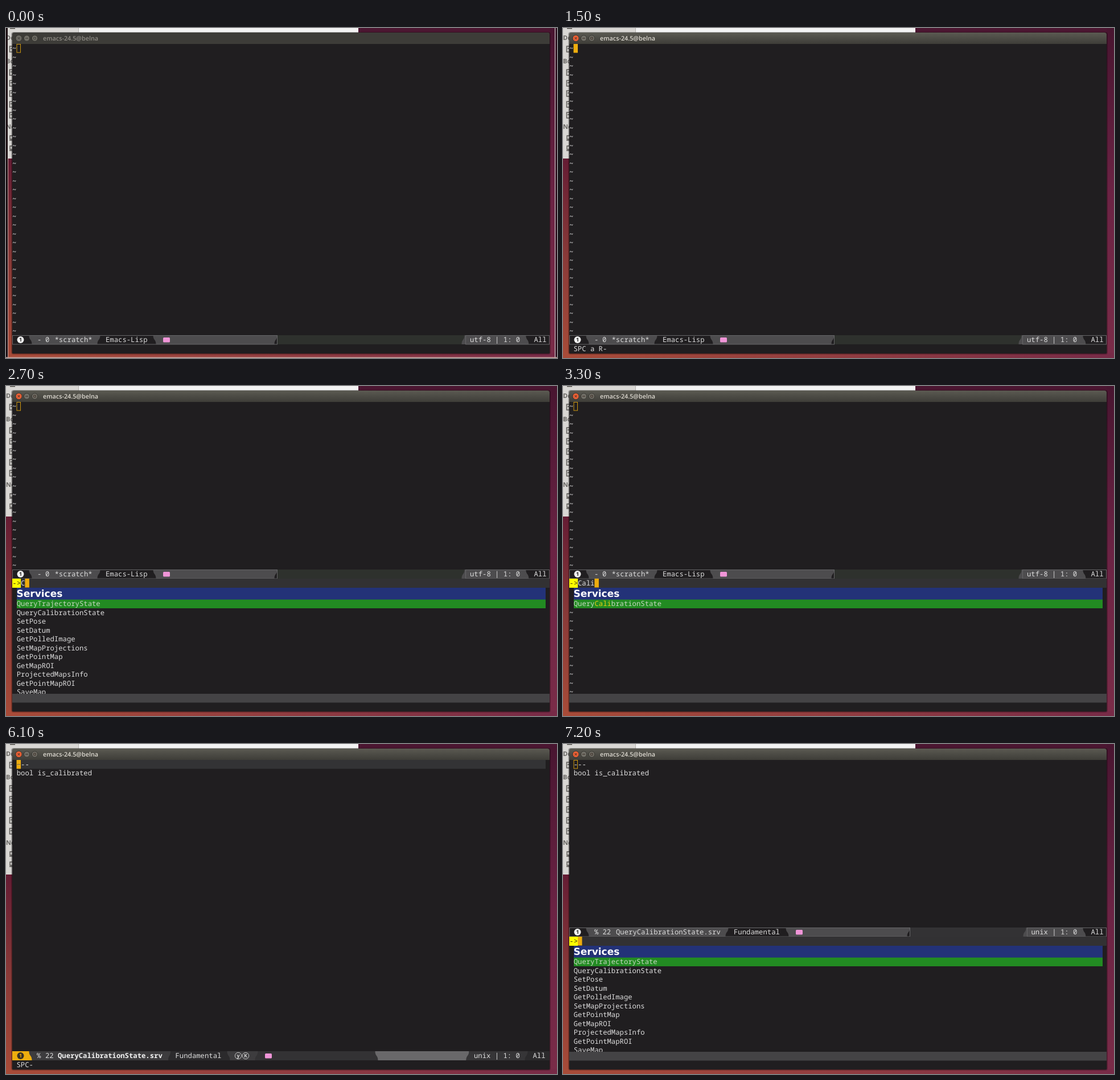
Recreate the animation shown at these times as an HTML page. Size 968 by 579 pixels, loop 8000 ms.

```html
<!DOCTYPE html>
<html lang="en">
<head>
<meta charset="utf-8">
<title>Editor session</title>
<style>
html, body { margin: 0; width: 100%; height: 100%; overflow: hidden; background: #4e1733; }
svg { display: block; width: 968px; height: 579px; }
text { white-space: pre; text-rendering: geometricPrecision; }
.m { font: 12.25px "Noto Sans Mono", "DejaVu Sans Mono", monospace; }
.b { font-weight: 700; }
.u { font: 600 10.8px "Open Sans", "Noto Sans", sans-serif; }
.h { font: 700 17px "DejaVu Sans", sans-serif; }
.p { font: 700 11px "Open Sans", "Noto Sans", sans-serif; }
.c { font: 700 9px "Noto Sans", sans-serif; text-anchor: middle; }
</style>
</head>
<body>
<svg id="stage" viewBox="0 0 968 579" xmlns="http://www.w3.org/2000/svg"></svg>
<script>
const LOOP = 8000, ROW = 15.5, TOP = 28;
const BG = '#201e20', FG = '#dedede', GOLD = '#eead0e';
let css = '', count = 0;

const rect = (x, y, w, h, fill, extra = '') =>
  `<rect x="${x}" y="${y}" width="${w}" height="${h}" fill="${fill}" ${extra}/>`;
const text = (x, y, s, fill = FG, cls = 'm') =>
  `<text x="${x}" y="${y}" fill="${fill}" class="${cls}">${s.replace(/>/g, '&gt;')}</text>`;
const circle = (x, y, r, fill, extra = '') =>
  `<circle cx="${x}" cy="${y}" r="${r}" fill="${fill}" ${extra}/>`;

// Shows the markup only between two times of the loop.
function on(from, to, markup) {
  const name = 'k' + count++, pct = t => (t / LOOP * 100) + '%';
  css += `@keyframes ${name}{0%{opacity:${from ? 0 : 1}}`;
  if (from) css += `${pct(from)}{opacity:1}`;
  css += to < LOOP ? `${pct(to)}{opacity:0}100%{opacity:0}}` : '100%{opacity:1}}';
  css += `.${name}{animation:${name} ${LOOP}ms step-end infinite}`;
  return `<g class="${name}">${markup}</g>`;
}

function gradient(id, dir, ...stops) {
  const end = dir === 'v' ? 'x2="0" y2="1"' : 'x2="1" y2="0"';
  return `<linearGradient id="${id}" x1="0" y1="0" ${end}>` + stops.map((c, i) =>
    `<stop offset="${i / (stops.length - 1)}" stop-color="${c}"/>`).join('') + '</linearGradient>';
}

// Mode line piece; l and r lean its two edges at the top.
function seg(y, x0, x1, l, r, fill) {
  const b = y + 16;
  return `<path fill="${fill}" d="M${x0 + l} ${y}H${x1 + r}C${x1 + r} ${y + 9} ${x1 - r} ${b - 9} ${x1 - r} ${b}` +
    `H${x0 - l}C${x0 - l} ${b - 9} ${x0 + l} ${y + 9} ${x0 + l} ${y}"/>`;
}

const badge = (y, disc, ink) => circle(25.5, y + 8, 6, disc) + text(25.5, y + 11.3, '1', ink, 'c');
const icon = (x, y) => rect(x, y + 4, 12, 8.5, '#f095d8', 'rx="1.5"');
const box = (x, y, w) => rect(x + .5, y + .5, w - 1, 15.5, 'none', 'stroke="#666668"');

function idleBar(y, o) {
  return rect(11, y, 944, 16, o.mid) +
    rect(11, y, o.end - 11, 16, BG) +
    seg(y, 43, o.m0, -2.5, 2.5, '#4d4c4e') +
    seg(y, o.m1, o.end - 3, -2.5, 2.5, '#4d4c4e') +
    seg(y, o.right, 916, 2.5, -2.5, '#4d4c4e') +
    seg(y, 916, 955, -2.5, 0, BG) +
    box(11, y, o.end - 11) + box(o.right + 4, y, 955 - o.right - 4) +
    badge(y, '#f0f0f0', '#222') +
    o.left.map(([x, s]) => text(x, y + 12.3, s)).join('') +
    text(o.m0 + 12, y + 12.3, o.mode) + icon(o.m1 + 15, y) +
    text(o.tx, y + 12.3, o.info) + text(927.5, y + 12.3, 'All');
}

const scratchBar = y => idleBar(y, {
  mid: '#2e312d', m0: 163, m1: 261, end: 477, right: 803,
  left: [[55, '-'], [69, '0'], [85.5, '*scratch*']],
  mode: 'Emacs-Lisp', tx: 815, info: 'utf-8 | 1: 0'
});

const serviceBar = y => idleBar(y, {
  mid: '#333234', m0: 288, m1: 394, end: 610, right: 811,
  left: [[55, '%'], [69.5, '22'], [93, 'QueryCalibrationState.srv']],
  mode: 'Fundamental', tx: 822.5, info: 'unix | 1: 0'
});

function activeBar(y) {
  const ring = (x, s) => circle(x, y + 8, 5.7, 'none', 'stroke="#c4c4c4"') + text(x, y + 11.2, s, '#d0d0d0', 'c');
  return rect(11, y, 944, 16, '#3d3c3e') +
    seg(y, 11, 43, 0, -2.5, GOLD) +
    seg(y, 287, 391, 2, -2.5, '#2b2a2c') +
    seg(y, 440, 651, 2.5, -2.5, '#333234') +
    seg(y, 651, 811, -2.5, 2.5, '#69686a') +
    seg(y, 811, 914, 2.5, 2.5, '#363537') +
    seg(y, 914, 955, 2.5, 0, '#2b2a2c') +
    badge(y, '#3a3126', GOLD) +
    text(54, y + 12.3, '%') + text(69, y + 12.3, '22') +
    text(91, y + 12.3, 'QueryCalibrationState.srv', '#f2f2f2', 'm b') +
    text(297.5, y + 12.3, 'Fundamental') + ring(408, 'y') + ring(421, 'K') + icon(455, y) +
    text(822, y + 12.3, 'unix | 1: 0') + text(925.5, y + 12.3, 'All');
}

const tildes = (n, top = TOP) => Array.from({ length: n }, (_, i) =>
  text(11, top + i * ROW + 12, '~', '#e8e8e8')).join('');
const hollow = rect(19, 28.5, 6.5, 14.5, 'none', `stroke="${GOLD}" stroke-opacity=".85"`);
const solid = rect(18.5, 28, 7.5, 15.5, GOLD);
const source = text(18.7, 39.7, '---') + text(18.7, 55.3, 'bool is_calibrated');
const echo = (from, to, s) => on(from, to, text(18.5, 567.3, s));

const names = ['QueryTrajectoryState', 'QueryCalibrationState', 'SetPose', 'SetDatum', 'GetPolledImage',
  'SetMapProjections', 'GetPointMap', 'GetMapROI', 'ProjectedMapsInfo', 'GetPointMapROI', 'SaveMap'];

const pickerBase = rect(11, 338, 944, 233, BG) + rect(11, 338, 944, 16, '#323133') +
  rect(11, 338, 15, 16, '#ffff00') + text(11.3, 350, '->', '#3a2a10') +
  rect(19, 354, 929, 21, '#233278') + text(18.5, 370.3, 'Services', '#fff', 'h') +
  rect(19, 374.7, 929, 15.3, '#228b22') + rect(11, 540, 944, 15.5, '#444345');
const fullList = `<g clip-path="url(#list)">` + names.map((s, i) =>
  text(18.7, 386.3 + i * ROW, s, i ? FG : '#c4d8c0')).join('') + '</g>';
const prompt = s => text(26, 350, s) + rect(26 + s.length * 7.35, 338, 7.5, 15.5, GOLD);
const match = s => text(18.7, 386.3, `Query<tspan fill="#e8d012">`.replace(/>/g, '\u0001') + s +
  '</tspan\u0001' + 'CalibrationState'.slice(s.length), '#c4d8c0').replace(/\u0001/g, '>') +
  tildes(10, 389.7);

// Desktop and the file window behind the editor
const folder = y => `<path d="M6.5 ${y - 5}h5v10h-5zM8 ${y - 1}h4" fill="none" stroke="#5c5a57" stroke-width="1.6"/>`;
const device = y => `<path d="M12 ${y - 4}H7v6h5M6 ${y + 4}h6" fill="none" stroke="#55534f" stroke-width="1.4"/>`;
const backdrop = rect(0, 0, 968, 579, '#4b1631') +
  rect(0, 229, 12, 350, 'url(#left)') + rect(955, 0, 13, 579, 'url(#right)') +
  rect(0, 570, 968, 9, 'url(#bottom)') +
  rect(0, 0, 128, 229, '#d9d7d4') + rect(128, 0, 491, 9, '#f3f3f3') + rect(127, 0, 1, 9, '#b5b3b0') +
  rect(7, 0, 9, 1.5, '#55534f') +
  [[21, 'De'], [62, 'Bo'], [177, 'Ne']].map(([y, s]) => text(0, y, s, '#6a6865', 'p')).join('') +
  [37, 78, 97, 115, 134, 153].map(folder).join('') + device(193) + device(211);

const shadow = rect(9, 7, 948, 566, '#000', 'rx="4" opacity=".2"') + rect(10, 7.5, 946, 564.5, '#000', 'rx="4" opacity=".25"');

function titleBar(fill, ink, close, mark) {
  const ring = x => circle(x, 18, 5.2, '#716f67', 'stroke="#35342f"');
  return `<path d="M11 28V12q0-4 4-4H951q4 0 4 4V28z" fill="${fill}"/>` +
    circle(22.5, 18, 5.6, close, 'stroke="#35342f"') + ring(36.5) + ring(50.5) +
    `<path d="M20.5 16l4 4m0-4l-4 4M34 18h5M48.7 16.2h3.6v3.6h-3.6z" fill="none" stroke="${mark}"/>` +
    text(65, 22, 'emacs-24.5@belna', ink, 'u');
}

const recorder = rect(0, 0, 3, 579, '#1d1014') + rect(3, 229, 1, 350, '#c9a9a4') +
  rect(964, 0, 1.5, 579, '#c9bcc2') + rect(965.5, 0, 2.5, 579, '#2a0f1d') + rect(0, 577.5, 968, 1.5, '#c9a9a4');

const defs = '<defs>' +
  gradient('left', 'v', '#651c34', '#8a3a38', '#a84b38') +
  gradient('right', 'v', '#481530', '#6b2344', '#7a2c48') +
  gradient('bottom', 'h', '#a84b38', '#913c40', '#772a47') +
  gradient('title', 'v', '#5b5a52', '#3e3d38') +
  '<clipPath id="list"><rect x="11" y="374" width="944" height="166"/></clipPath></defs>';

const scene = defs + backdrop + shadow + rect(11, 20, 944, 551, BG) +
  titleBar('url(#title)', '#dfdbd2', '#ea6035', '#3a2d26') +
  on(0, 100, titleBar('#3d3c38', '#8f8c85', '#6b6962', '#3a3935') + recorder) +

  on(0, 1800, tildes(33) + scratchBar(539)) +
  on(0, 100, hollow) + on(100, 1800, solid) +
  echo(1000, 1200, 'SPC-') + echo(1200, 1400, 'SPC a-') + echo(1400, 1800, 'SPC a R-') +

  on(1800, 4200, tildes(19) + hollow + scratchBar(322) + pickerBase) +
  on(1800, 2800, fullList) +
  on(1800, 2700, prompt('')) + on(2700, 2800, prompt('C')) +
  [[2800, 3000, 'Ca'], [3000, 3200, 'Cal'], [3200, 4200, 'Cali']]
    .map(([a, b, s]) => on(a, b, prompt(s) + match(s))).join('') +

  on(4200, 6900, rect(19, 28, 929, 15.5, '#333335') + solid + source +
    rect(19.5, 35.5, 5.5, 1, '#6b5418') + activeBar(539)) +
  echo(6100, 6300, 'SPC-') + echo(6300, 6500, 'SPC a-') + echo(6500, 6900, 'SPC a R-') +

  on(6900, LOOP, source + hollow + serviceBar(322) + pickerBase + fullList + prompt(''));

const style = document.createElement('style');
style.textContent = css;
document.head.append(style);
document.getElementById('stage').innerHTML = scene;
</script>
</body>
</html>
```
